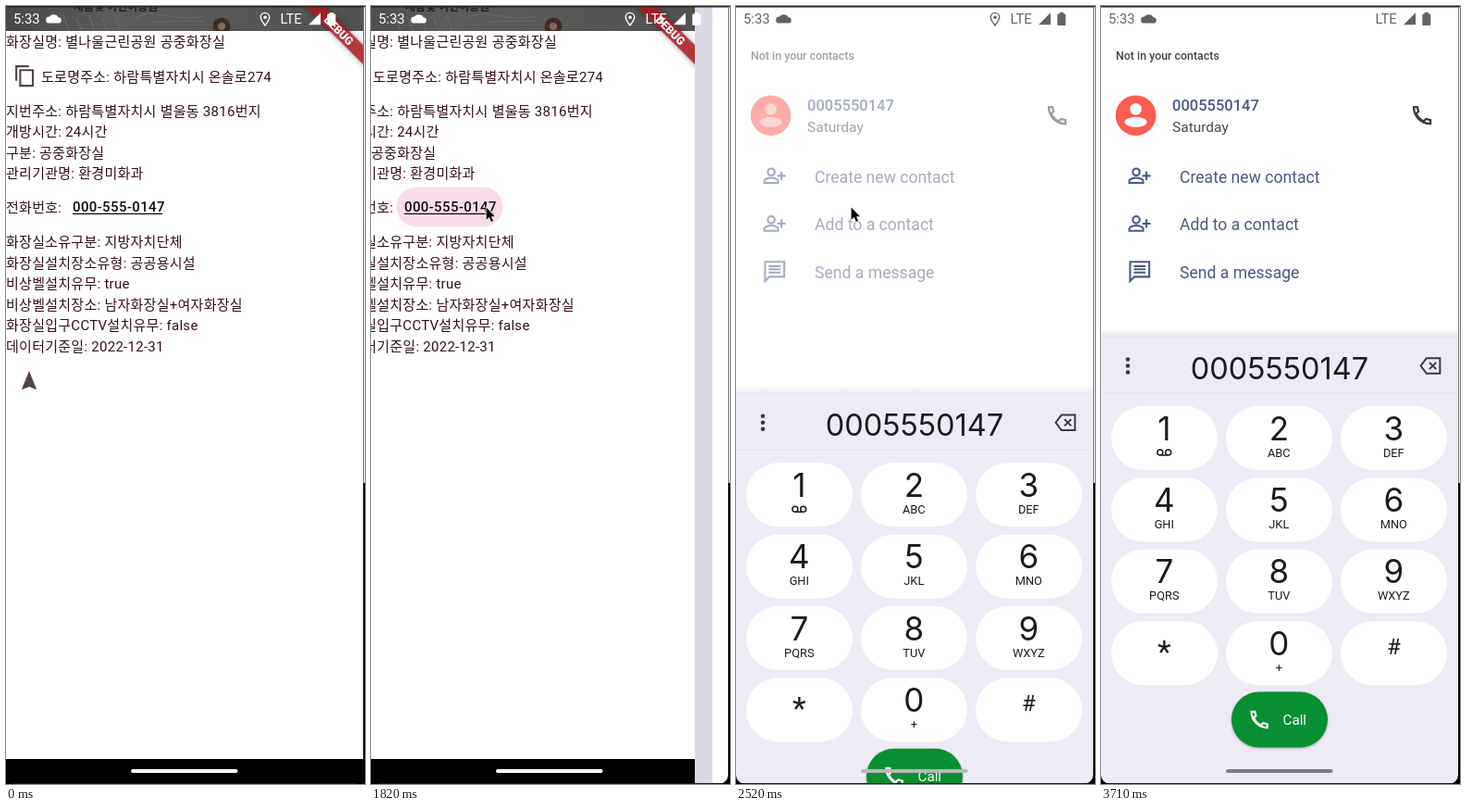
An HTML page with a canvas that plays this animation: 388 px wide and 840 px high, repeating every 5040 ms.

```html
<!DOCTYPE html>
<html lang="ko">
<head>
<meta charset="utf-8">
<title>Call from detail sheet</title>
<style>
html, body { margin: 0; width: 100%; height: 100%; overflow: hidden; background: #fff; }
canvas { display: block; width: 388px; height: 840px; }
</style>
</head>
<body>
<canvas id="stage" width="388" height="840"></canvas>
<script>
const ctx = document.getElementById('stage').getContext('2d');
const LOOP = 5040, STEP = 70, W = 386, GAP = 19;
const FONT = 'Roboto, "Noto Sans CJK KR", "Noto Sans CJK", sans-serif';
const ROUND_FONT = 'Inter, sans-serif';
const INK = '#33101f', BLUE = '#4a5a84', DARK = '#1d1b20';
const DIALED = '0005550147';

const clamp = v => Math.max(0, Math.min(1, v));
const ramp = (t, a, b) => clamp((t - a) / (b - a));
const mix = (a, b, k) => `rgb(${a.map((v, i) => Math.round(v + (b[i] - v) * k))})`;

function text(str, x, y, size, color, { weight = 400, align = 'left', spacing = 0, font = FONT } = {}) {
  ctx.font = `${weight} ${size}px ${font}`;
  ctx.letterSpacing = spacing + 'px';
  ctx.textAlign = align;
  ctx.fillStyle = color;
  ctx.fillText(str, x, y);
}

function box(x, y, w, h, color, r = 0) {
  ctx.fillStyle = color;
  ctx.beginPath();
  ctx.roundRect(x, y, w, h, r);
  ctx.fill();
}

function dot(x, y, r, color) {
  ctx.fillStyle = color;
  ctx.beginPath();
  ctx.arc(x, y, r, 0, 7);
  ctx.fill();
}

function scoped(draw, x = 0, y = 0, alpha = 1) {
  if (alpha <= 0) return;
  ctx.save();
  ctx.translate(x, y);
  ctx.globalAlpha *= alpha;
  draw();
  ctx.restore();
}

// Icons are drawn in a 24-unit box; a line width turns the fill into a stroke.
function icon(d, x, y, scale, color, line = 0) {
  scoped(() => {
    ctx.scale(scale, scale);
    const path = new Path2D(d);
    ctx.fillStyle = ctx.strokeStyle = color;
    ctx.lineWidth = line;
    if (line) ctx.stroke(path); else ctx.fill(path, 'evenodd');
  }, x, y);
}

const ICONS = {
  copy: 'M3 17V2H16M7 6H20V22H7Z',
  arrow: 'M12 2L4.5 20.3l.7.7L12 18l6.8 3 .7-.7Z',
  cloud: 'M19.4 11A7.5 6 0 0 0 5.6 10A5 5 0 0 0 5 20H19.5A4.5 4.5 0 0 0 19.4 11Z',
  pin: 'M12 22C8 17 5 13 5 9a7 7 0 0 1 14 0c0 4-3 8-7 13Z',
  phone: 'M4 4h3.5l1 4.2-2.3 2.3c1.6 3.2 4.1 5.7 7.3 7.3l2.3-2.3 4.2 1V20C11 20 4 13 4 4Z',
  person: 'M13 7.5a3.7 3.7 0 1 1-7.4 0a3.7 3.7 0 1 1 7.4 0ZM2 19v-2c0-2 4-3.5 7.3-3.5s7.3 1.5 7.3 3.5v2ZM20 7v9M15.6 11.5h8.8',
  message: 'M3 21V3H21V17H7ZM6.5 7h11M6.5 10h11M6.5 13h11',
  erase: 'M8 4H22V20H8L2 12ZM11 8.5l7 7M18 8.5l-7 7',
  mic: 'M9 5a3 3 0 0 1 6 0v6a3 3 0 0 1-6 0ZM5.5 11a6.5 6.5 0 0 0 13 0M12 17.5V22',
  cursor: 'M0 0V15.5L3.6 12.2L6.2 18L8.8 16.9L6.3 11.2H11Z'
};

// Emphasized easing, made of two joined cubic segments.
function emphasized(t) {
  if (t <= 0) return 0;
  if (t >= 1) return 1;
  const split = 1 / 6;
  const [xs, ys] = t < split
    ? [[0, .05, .1333, split], [0, 0, .06, .4]]
    : [[split, .2083, .25, 1], [.4, .82, 1, 1]];
  const bez = (p, u) => {
    const v = 1 - u;
    return v * v * v * p[0] + 3 * v * v * u * p[1] + 3 * v * u * u * p[2] + u * u * u * p[3];
  };
  let lo = 0, hi = 1;
  for (let i = 0; i < 24; i++) {
    const mid = (lo + hi) / 2;
    if (bez(xs, mid) < t) lo = mid; else hi = mid;
  }
  return bez(ys, lo);
}

function mapStrip() {
  const g = ctx.createLinearGradient(0, 0, W, 0);
  g.addColorStop(0, '#484848');
  g.addColorStop(.3, '#5c5c5a');
  g.addColorStop(1, '#525250');
  box(0, 0, W, 27, g);
  ctx.strokeStyle = '#6d6d6b';
  ctx.lineWidth = 1;
  ctx.beginPath();
  for (let i = 0; i < 5; i++) {
    ctx.moveTo(62 + i * 14, 10 + i % 2 * 3);
    ctx.lineTo(68 + i * 14, 27);
  }
  ctx.moveTo(140, 12);
  ctx.bezierCurveTo(165, 2, 180, 18, 214, 11);
  ctx.moveTo(160, 17);
  ctx.lineTo(214, 16);
  ctx.stroke();
  text('새봄빛 어린이공원', 73, 5, 12, '#1e1e1e', { weight: 700 });
  dot(233, 22, 9.5, '#3d2d24');
  dot(233, 22, 4, '#806a58');
}

function debugRibbon() {
  scoped(() => {
    ctx.rotate(Math.PI / 4);
    ctx.shadowColor = 'rgba(0,0,0,.5)';
    ctx.shadowBlur = 6;
    box(-60, -7.4, 120, 14.8, 'rgba(183,28,36,.8)');
    ctx.shadowBlur = 0;
    text('DEBUG', 0, 4.4, 12.2, '#fff', { weight: 900, align: 'center' });
  }, W - 26.3, 26.3);
}

const DETAILS = [
  [0, 38, '화장실명: 별나울근린공원 공중화장실'],
  [38, 76, '도로명주소: 하람특별자치시 온솔로274'],
  [0, 113, '지번주소: 하람특별자치시 별울동 3816번지'],
  [0, 135.5, '개방시간: 24시간'],
  [0, 158, '구분: 공중화장실'],
  [0, 180.5, '관리기관명: 환경미화과'],
  [0, 217, '전화번호:'],
  [0, 254.5, '화장실소유구분: 지방자치단체'],
  [0, 277, '화장실설치장소유형: 공공용시설'],
  [0, 299.5, '비상벨설치유무: true'],
  [0, 322, '비상벨설치장소: 남자화장실+여자화장실'],
  [0, 344.5, '화장실입구CCTV설치유무: false'],
  [0, 367, '데이터기준일: 2022-12-31']
];

function detailScreen(press) {
  ctx.beginPath();
  ctx.rect(0, 0, W, 840);
  ctx.clip();
  mapStrip();
  box(0, 27, W, 787, '#fff');
  box(0, 813, W, 27, '#000');
  scoped(() => box(63.5, 195.5, 115, 43, '#f8dcea', 21.5), 0, 0, press);
  for (const [x, y, line] of DETAILS) text(line, x, y + 5.6, 15, INK, { spacing: .27 });
  text('000-555-0147', 72, 222.4, 15, '#100a0d', { weight: 500, spacing: .4 });
  box(72, 223.8, 97, 1.2, '#100a0d');
  icon(ICONS.copy, 8, 63, 1.05, '#54434a', 2);
  icon(ICONS.arrow, 12.4, 392, 1.05, '#54434a');
  debugRibbon();
}

function statusBar(color, showPin) {
  text('5:33', 8, 19.3, 14.8, color);
  icon(ICONS.cloud, 43, 4.6, .7, color);
  if (showPin) {
    icon(ICONS.pin, 271.8, 6, .68, color, 2);
    dot(280, 12.2, 1.8, color);
  }
  text('LTE', 296.5, 19.3, 14.8, color);
  icon('M0 13H13V0Z', 327, 7.3, 1, color);
  box(347.3, 8.5, 9, 12.5, color, 1.2);
  box(349.6, 7, 4.4, 2, color);
}

function searchHint() {
  const fade = ctx.createLinearGradient(74, 0, 115, 0);
  fade.addColorStop(0, 'rgba(73,69,79,.2)');
  fade.addColorStop(1, 'rgb(73,69,79)');
  text('Search contacts & plac...', 77, 82, 17.1, fade);
  icon(ICONS.mic, 281.3, 64, .82, '#49454f', 2);
}

function contactList() {
  text('Not in your contacts', 16, 57.5, 12.4, '#45434b', { weight: 500 });
  dot(37.6, 118.2, 21.8, '#fc5c52');
  dot(37.6, 111.3, 6.3, '#fff');
  ctx.beginPath();
  ctx.ellipse(37.6, 125.3, 12, 5.5, 0, 0, 7);
  ctx.fill();
  text(DIALED, 77, 113, 16.5, BLUE, { weight: 500 });
  text('Saturday', 77, 136.2, 15.5, '#4b4951');
  icon(ICONS.phone, 333.5, 104.5, 1.13, '#3a3840', 2);
  const rows = [['person', 'Create new contact'], ['person', 'Add to a contact'], ['message', 'Send a message']];
  rows.forEach(([name, label], i) => {
    const y = 184 + i * 51.6;
    if (name === 'person') icon(ICONS.person, 28.5, y - 12.5, 1.03, BLUE, 2);
    else icon(ICONS.message, 28, y - 14.4, 1.15, BLUE, 1.8);
    text(label, 85, y + 6.8, 17.6, BLUE);
  });
}

function key(col, row, digit, letters) {
  const x = 11 + col * 124, y = 432 + row * 77.4, cx = x + 57.3;
  box(x, y, 115, 69, '#fff', 34.5);
  const center = { align: 'center' };
  if (digit === '*') text(digit, cx, y + 45, 34, DARK, center);
  else if (digit === '#') text(digit, cx, y + 36, 24, DARK, center);
  else text(digit, cx, y + 36.5, 35, DARK, { align: 'center', font: ROUND_FONT });
  if (digit === '1') {
    ctx.strokeStyle = DARK;
    ctx.lineWidth = 1.5;
    ctx.beginPath();
    ctx.arc(cx - 4.4, y + 50, 3, 0, 7);
    ctx.moveTo(cx + 7.4, y + 50);
    ctx.arc(cx + 4.4, y + 50, 3, 0, 7);
    ctx.moveTo(cx - 4.4, y + 53);
    ctx.lineTo(cx + 4.4, y + 53);
    ctx.stroke();
  } else {
    text(letters, cx, y + 54.6, 12.8, DARK, center);
  }
}

function callButton() {
  scoped(() => {
    ctx.shadowColor = 'rgba(0,0,0,.3)';
    ctx.shadowBlur = 3;
    ctx.shadowOffsetY = 1;
    box(141, 740.5, 104, 60, '#078f32', 30);
  });
  icon(ICONS.phone, 158.2, 757.5, 1.08, '#fff', 2);
  text('Call', 196.5, 776, 15.2, '#fff');
}

function dialpad() {
  const shade = ctx.createLinearGradient(0, 349, 0, 358);
  shade.addColorStop(0, 'rgba(90,85,100,0)');
  shade.addColorStop(1, 'rgba(90,85,100,.16)');
  box(0, 349, W, 9, shade);
  box(0, 358, W, 500, '#eeebf6');
  box(0, 417.5, W, 1, '#e4e0ec');
  for (let i = -1; i < 2; i++) dot(29, 388.5 + i * 7, 2.3, '#3a3840');
  text(DIALED, 193, 403, 32.5, DARK, { align: 'center', font: ROUND_FONT });
  icon(ICONS.erase, 343.5, 376, 1.04, '#3a3840', 1.9);
  const letters = ['', 'ABC', 'DEF', 'GHI', 'JKL', 'MNO', 'PQRS', 'TUV', 'WXYZ', '', '+', ''];
  [...'123456789*0#'].forEach((d, i) => key(i % 3, Math.floor(i / 3), d, letters[i]));
  callButton();
}

function dialerScreen(t) {
  ctx.beginPath();
  ctx.rect(0, 0, W, 840);
  ctx.clip();
  box(0, 0, W, 840, '#fff');
  const hint = ramp(t, 2285, 2480) * (1 - ramp(t, 2450, 2520));
  scoped(searchHint, 0, 0, hint);
  scoped(contactList, 0, 0, ramp(t, 2450, 2590));
  if (t >= 2450) {
    const rest = 1 - ramp(t, 2380, 2660);
    const settle = t < 2800 ? 1 : 0;
    scoped(dialpad, 0, 482 * rest ** 3 + settle);
  }
}

function handle(t) {
  const darken = ramp(t, 2240, 2310) * .45 + ramp(t, 2310, 3360) * .55;
  box(135, 824, 115.5, 4, mix([255, 255, 255], [128, 125, 133], darken), 2);
}

function frameEdges() {
  box(0, 0, 388, 1.6, '#2e221d');
  box(W, 1.6, 1, 514, '#777');
  box(W + 1, 1.6, 1, 514, '#f2f2f2');
  box(W, 515, 2, 325, '#000');
  box(0, 839, 388, 1, '#1a1a1a');
  ctx.fillStyle = '#000';
  ctx.fill(new Path2D('M0 830V840H10A10 10 0 0 1 0 830ZM386 830V840H376A10 10 0 0 0 386 830Z'));
}

function pointer(t) {
  const alpha = t < 1400 ? 0 : 1 - ramp(t, 3430, 3710);
  scoped(() => {
    ctx.lineJoin = 'round';
    icon(ICONS.cursor, 0, 0, .86, '#fff', 2);
    icon(ICONS.cursor, 0, 0, .86, '#000');
  }, 124.6, 217.5, alpha);
}

function render(t) {
  const shift = Math.round((W + GAP) * emphasized((t - 1770) / 512));
  box(0, 0, 388, 840, '#dadae7');
  if (shift < W) scoped(() => detailScreen(ramp(t, 1610, 1750)), -shift);
  if (shift > 0) scoped(() => dialerScreen(t), W + GAP - shift);
  statusBar(mix([255, 255, 255], [99, 97, 101], ramp(t, 2170, 2310)), t < 2590);
  handle(t);
  frameEdges();
  pointer(t);
}

const start = performance.now();
function tick() {
  const t = (performance.now() - start) % LOOP;
  render(Math.floor(t / STEP) * STEP);
  requestAnimationFrame(tick);
}
tick();
</script>
</body>
</html>
```
